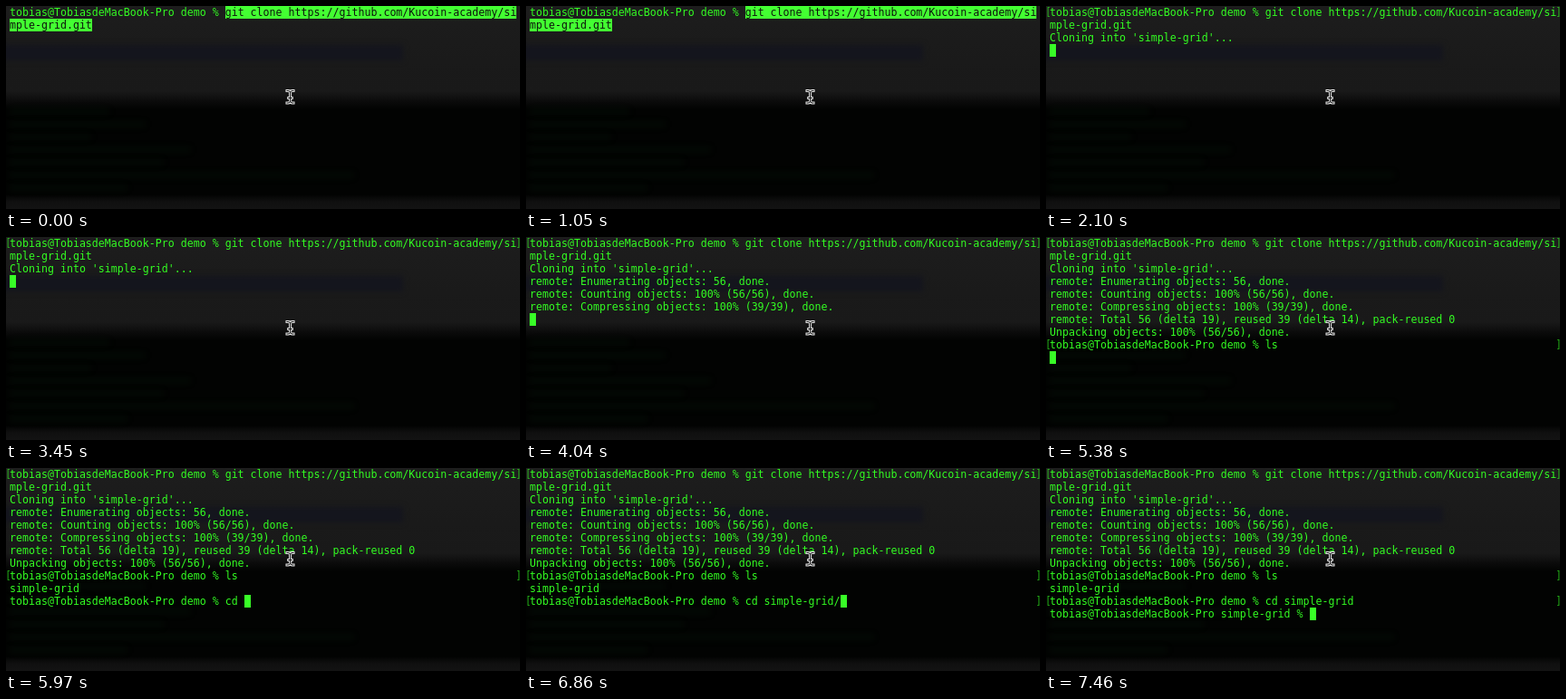
An HTML page that plays this animation: 567x224 px, repeating every 8000 ms.

```html
<!DOCTYPE html>
<html lang="en">
<head>
<meta charset="utf-8">
<title>Terminal</title>
<style>
  html, body { margin: 0; width: 100%; height: 100%; overflow: hidden; background: #000; }
  #stage {
    position: relative; width: 567px; height: 224px; overflow: hidden;
    background: linear-gradient(#1d1d1d 0, #1a1a1a 60px, #191919 94px, #0a0a0a 106px,
      #020302 114px, #020302 208px, #101010 216px, #131313 224px);
  }
  .blur { position: absolute; filter: blur(3px); }
  .line, .edge {
    position: absolute; height: 14px; margin: 0; white-space: pre; color: #33fe22;
    font: 11.627px/14px "DejaVu Sans Mono", "Liberation Mono", monospace;
    font-variant-ligatures: none;
  }
  .line { left: 4px; }
  .edge { opacity: .65; }
  .sel { display: inline-block; height: 14px; vertical-align: top; background: #43ff32; color: #0d140c; }
  #cursor { position: absolute; width: 7px; height: 14px; background: #38fe27; }
  svg { position: absolute; left: 0; top: 0; }
</style>
</head>
<body>
<div id="stage">
  <div class="blur" style="left:-4px;top:43px;width:442px;height:17px;background:#14151d"></div>
  <div id="smudges"></div>
  <div id="screen"></div>
  <div id="cursor"></div>
  <svg width="567" height="224" fill="none" stroke-linecap="square">
    <defs>
      <path id="beam" d="M310 93.5h1.2q2.3 0 2.3 2.2V104.800q0 2.200-2.300 2.200H310M317 93.500h-1.200q-2.300 0-2.300 2.200M317 107h-1.200q-2.300 0-2.300-2.200M311.700 101.500h3.600"/>
    </defs>
    <use href="#beam" stroke="#e8e8e8" stroke-width="3"/>
    <use href="#beam" stroke="#111" stroke-width="1"/>
  </svg>
</div>
<script>
const LOOP = 8000, CELL = 7, ROW = 14, LEFT = 4;
const user = "tobias@TobiasdeMacBook-Pro";
const prompt = user + " demo % ";
const command = ["git clone https://github.com/Kucoin-academy/si", "mple-grid.git"];

const start = [prompt + command[0], command[1]];
const cloning = [...start, "Cloning into 'simple-grid'..."];
const counted = [...cloning,
  "remote: Enumerating objects: 56, done.",
  "remote: Counting objects: 100% (56/56), done.",
  "remote: Compressing objects: 100% (39/39), done."];
const cloned = [...counted,
  "remote: Total 56 (delta 19), reused 39 (delta 14), pack-reused 0",
  "Unpacking objects: 100% (56/56), done."];
const listing = [...cloned, prompt + "ls"];
const listed = [...listing, "simple-grid"];
const typed = text => [...listed, prompt + text];
const entered = [...typed("cd simple-grid"), user + " simple-grid % "];

// [time, lines, cursor shown, rows with edge brackets, command selected]
const steps = [
  [0, start, 0, [], 1],
  [450, start, 1, [], 1],
  [1050, start, 0, [], 1],
  [1350, start, 1, []],
  [1950, start, 0, []],
  [2100, [...cloning, ""], 1, [0]],
  [3000, [...cloning, ""], 0, [0]],
  [3450, [...cloning, ""], 1, [0]],
  [4040, [...counted, ""], 1, [0]],
  [4340, [...cloned, prompt], 1, [0]],
  [4940, [...cloned, prompt], 0, [0]],
  [5240, listing, 1, [0]],
  [5380, [...listing, ""], 1, [0, 8]],
  [5530, typed(""), 1, [0, 8]],
  [5680, typed("c"), 1, [0, 8]],
  [5830, typed("cd"), 1, [0, 8]],
  [5970, typed("cd "), 1, [0, 8]],
  [6270, typed("cd s"), 1, [0, 8]],
  [6570, typed("cd si"), 1, [0, 8]],
  [6860, typed("cd simple-grid/"), 1, [0, 8, 10]],
  [7460, entered, 1, [0, 8, 10]]
];

const screenEl = document.getElementById("screen");
const cursor = document.getElementById("cursor");

function add(parent, tag, cls, text) {
  const el = document.createElement(tag);
  el.className = cls;
  el.textContent = text;
  return parent.appendChild(el);
}

function edge(text, x, row) {
  const el = add(screenEl, "div", "edge", text);
  el.style.left = x + "px";
  el.style.top = row * ROW + "px";
}

function draw([, lines, shown, edges, selected]) {
  screenEl.textContent = "";
  lines.forEach((text, row) => {
    const cut = selected ? (row ? 0 : prompt.length) : text.length;
    const el = add(screenEl, "div", "line", text.slice(0, cut));
    el.style.top = row * ROW + "px";
    if (selected) add(el, "span", "sel", text.slice(cut));
  });
  for (const row of edges) {
    edge("[", -1, row);
    edge("]", 562, row);
  }
  const last = lines.length - 1;
  cursor.style.left = LEFT + lines[last].length * CELL + "px";
  cursor.style.top = last * ROW + "px";
  cursor.style.visibility = shown ? "visible" : "hidden";
}

// faint text of the window behind
[110, 150, 90, 200, 170, 380, 130].forEach((width, i) => {
  const el = add(document.getElementById("smudges"), "div", "blur", "");
  el.style.cssText = `left:4px;top:${113 + i * ROW}px;width:${width}px;height:7px;background:rgba(20,60,30,.13)`;
});

const origin = performance.now();
let current = -1;
function tick() {
  const t = (performance.now() - origin) % LOOP;
  const next = steps.findLastIndex(s => s[0] <= t);
  if (next !== current) draw(steps[current = next]);
  requestAnimationFrame(tick);
}
tick();
</script>
</body>
</html>
```
